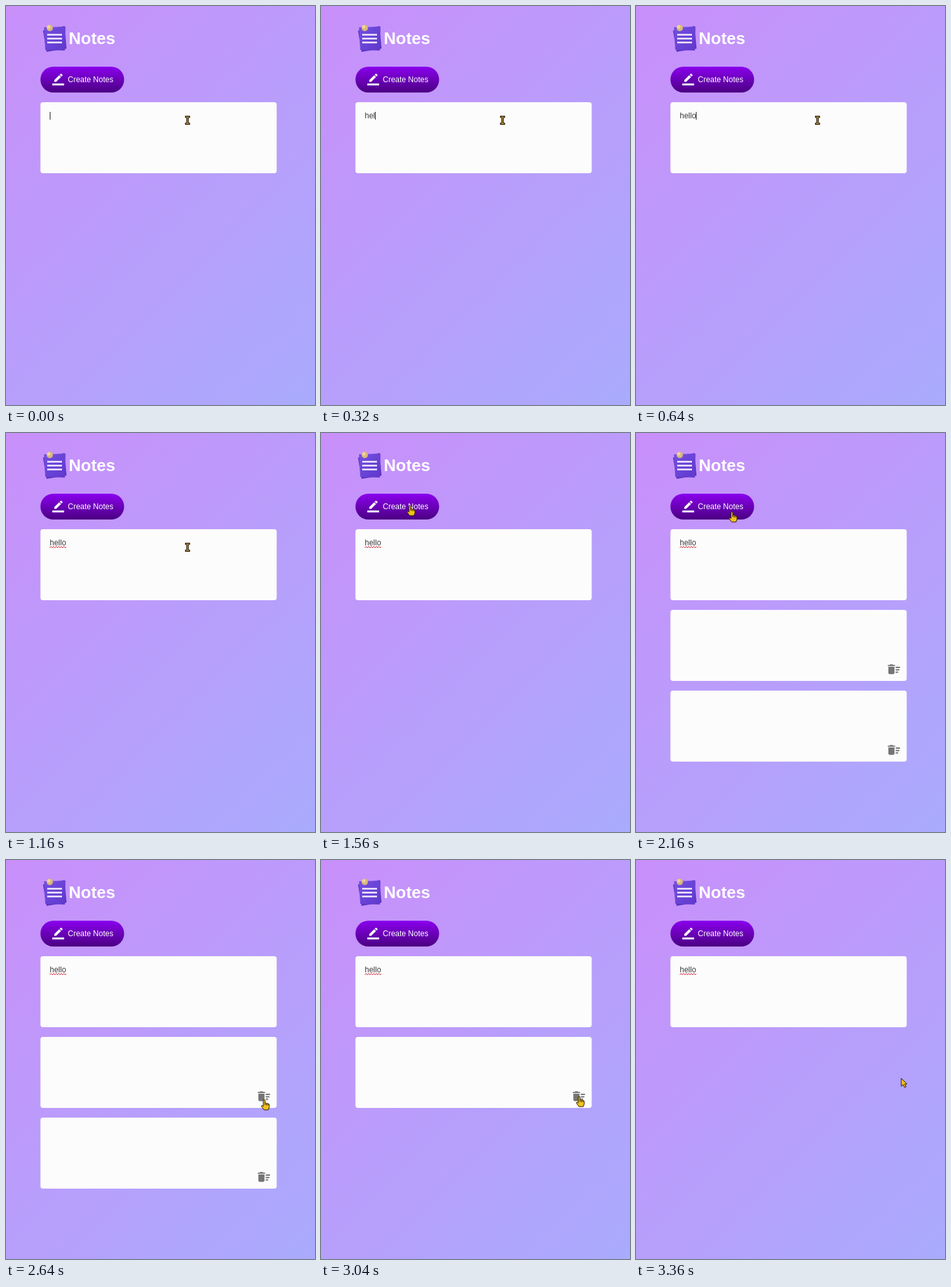
An HTML page for the animation above (3400 ms loop, 480 px wide and 618 px high).

```html
<!DOCTYPE html>
<html lang="en">
<head>
<meta charset="utf-8">
<title>Notes</title>
<style>
  html, body { margin: 0; width: 100%; height: 100%; overflow: hidden; }
  svg { display: block; width: 480px; height: 618px; }
  text { font-family: "Liberation Sans", Arial, sans-serif; font-size: 12px; fill: #fff; }
</style>
</head>
<body>
<svg viewBox="0 0 480 618">
  <defs>
    <linearGradient id="sky" gradientUnits="userSpaceOnUse" x1="-34.5" y1="34.5" x2="514.5" y2="583.5">
      <stop stop-color="#c98ffa"/><stop offset="1" stop-color="#a9abfd"/>
    </linearGradient>
    <linearGradient id="violet" x2="0" y2="1">
      <stop stop-color="#8a00ee"/><stop offset="1" stop-color="#4b0082"/>
    </linearGradient>
    <linearGradient id="paper" x2="1" y2="1">
      <stop stop-color="#7450e2"/><stop offset="1" stop-color="#6038cc"/>
    </linearGradient>
    <path id="bin" fill="#757575" transform="translate(389.2 354.4) scale(.95)"
      d="M15 16h4v2h-4zm0-8h7v2h-7zm0 4h6v2h-6zM3 18c0 1.1.9 2 2 2h6c1.1 0 2-.9 2-2V8H3zM14 5h-3l-1-1H6L5 5H2v2h12z"/>
  </defs>

  <rect width="480" height="618" fill="url(#sky)"/>

  <g id="heading">
    <path d="M57.5 38 91 31 94 66 63 71z" fill="#5835bd"/>
    <path d="M59 33 92.500 32 91.500 69 61 68z" fill="url(#paper)"/>
    <path d="M64 44.500h23M64 50.500h23M64 56.500h23" stroke="#f2edff" stroke-width="2.500"/>
    <path d="M65 38l2-3" stroke="#8d7da8" stroke-width="1.500"/>
    <circle cx="68" cy="34" r="4.900" fill="#d9b779"/>
    <circle cx="66.500" cy="32.300" r="2.600" fill="#efd49e"/>
    <text x="97.500" y="59" style="font-size:26px;font-weight:bold">Notes</text>
  </g>

  <g id="button">
    <rect x="53.500" y="94" width="130" height="40" rx="20" fill="url(#violet)"/>
    <path fill="#fff" transform="translate(72 104.700) scale(.76)"
      d="M17.750 7 14 3.250l-10 10V17h3.750zM20.710 4.040a1 1 0 0 0 0-1.410L18.370.290a1 1 0 0 0-1.410 0L15 2.250 18.750 6zM0 20h24v4H0z"/>
    <text x="96" y="117.500">Create Notes</text>
  </g>

  <g id="notes"></g>
  <text id="typed" x="68" y="174" style="fill:#3a3a3a"></text>
  <path id="squiggle" d="M68 178l2-2.500 2 2.500 2-2.500 2 2.500 2-2.500 2 2.500 2-2.500 2 2.500 2-2.500 2 2.500 2-2.500 2 2.500 1.500-2"
    fill="none" stroke="#d8373f"/>
  <rect id="caret" y="164" width="1" height="12" fill="#222"/>

  <g id="pointer" stroke="#241c08" stroke-linejoin="round">
    <path id="beam" fill="#a8813a" d="M-3.500-6.500h7v2.300h-2.200v8.400h2.200v2.300h-7v-2.300h2.200v-8.400h-2.200z"/>
    <path id="hand" fill="#f3c01d"
      d="M-1.300 1Q0-.7 1.300 1V5.500Q2.500 4.600 3.700 6 5 5.200 6 6.700 7.800 6.300 8 8V11.500L6.500 16H-.2L-4 11Q-4.700 8.700-2.700 9.200L-1.300 10.500zM1.300 5.500v3M3.700 6v3M6 6.700v2.500"/>
    <path id="arrow" fill="#f3bd20" d="M0 0V12.500L3 9.800 5.200 14.300 7.500 13.200 5.400 9H9z"/>
  </g>
</svg>
<script>
const LOOP = 3400, STEP = 40, PITCH = 125, WORD = "hello";
const $ = id => document.getElementById(id);
const show = (node, on) => node.setAttribute("visibility", on ? "visible" : "hidden");

// [time, notes on screen]
const noteCounts = [[0, 1], [1640, 2], [2080, 3], [2720, 2], [3160, 1]];
// [time, x, y] of the pointer hotspot
const path = [
  [0, 282, 177], [1160, 282, 177], [1440, 138, 112], [1640, 138, 112], [1880, 140, 113],
  [2120, 140, 113], [2480, 401, 371], [2760, 401, 371], [2960, 401, 366],
  [3160, 401, 366], [3340, 412, 338], [LOOP, 412, 338]
];

const notes = [0, 1, 2].map(i => {
  const y = 149 + i * PITCH;
  $("notes").insertAdjacentHTML("beforeend",
    `<g><rect x="53.5" y="${y}" width="367" height="110" rx="4" fill="#fcfcfc"/>` +
    (i ? `<use href="#bin" y="${(i - 1) * PITCH}"/>` : "") + "</g>");
  return $("notes").lastElementChild;
});

function pointerAt(t) {
  const i = path.findIndex(key => key[0] > t);
  const [t0, x0, y0] = path[i - 1], [t1, x1, y1] = path[i];
  const u = (t - t0) / (t1 - t0), ease = u * u * (3 - 2 * u);
  return [x0 + (x1 - x0) * ease, y0 + (y1 - y0) * ease];
}

function pointerShape(x, y, count) {
  if (x > 53 && x < 184 && y > 94 && y < 134) return "hand";
  const row = Math.floor((y - 149) / PITCH), dy = (y - 149) - row * PITCH;
  if (row < 0 || row >= count || dy > 110 || x < 53 || x > 421) return "arrow";
  return row && x > 389 && x < 412 && dy > 81 && dy < 104 ? "hand" : "beam";
}

function draw(t) {
  const count = noteCounts.filter(([at]) => at <= t).pop()[1];
  notes.forEach((note, i) => show(note, i < count));

  const letters = Math.max(0, Math.min(WORD.length, Math.floor((t - 20) / 100)));
  const typed = $("typed");
  typed.textContent = WORD.slice(0, letters);
  $("caret").setAttribute("x", Math.round(68 + (letters ? typed.getComputedTextLength() : 0)));
  show($("caret"), t < 1040);
  show($("squiggle"), t >= 920);

  const [x, y] = pointerAt(t), shape = pointerShape(x, y, count);
  $("pointer").setAttribute("transform", `translate(${x} ${y})`);
  for (const id of ["beam", "hand", "arrow"]) show($(id), id === shape);
}

const start = performance.now();
function tick() {
  const t = (performance.now() - start) % LOOP;
  draw(Math.floor(t / STEP) * STEP);
  requestAnimationFrame(tick);
}
tick();
</script>
</body>
</html>
```
